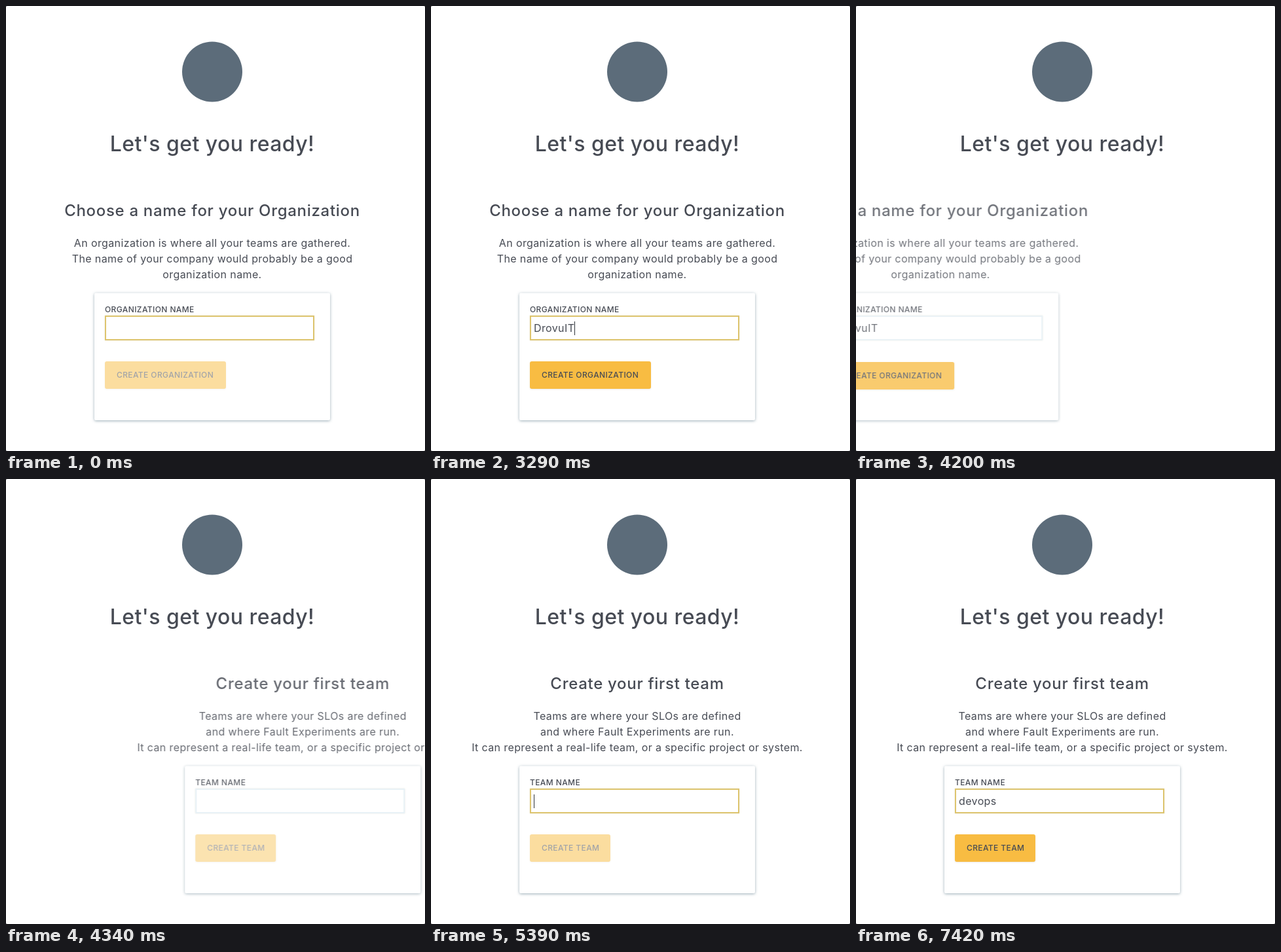
Animation of 640x680 px, one loop 7490 ms. Source, as an HTML page:

```html
<!DOCTYPE html>
<html lang="en">
<head>
<meta charset="utf-8">
<title>Onboarding</title>
<style>
  html, body { margin: 0; width: 100%; height: 100%; overflow: hidden; background: #858585; }
  svg { display: block; width: 640px; height: 680px; }
  text { font-family: Inter, "Open Sans", sans-serif; fill: #474b54; white-space: pre; }
  .title { font-size: 32px; font-weight: 500; letter-spacing: .014em; }
  .heading { font-size: 24px; font-weight: 500; letter-spacing: .029em; }
  .body { font-size: 16px; letter-spacing: .024em; }
  .small { font-size: 12px; font-weight: 500; letter-spacing: .033em; }
  .mid { text-anchor: middle; }
  .card { fill: #fff; filter: drop-shadow(0 1px 2px rgba(64, 98, 116, .52)); }
  .button { fill: #f8bc42; filter: drop-shadow(0 1px 1px rgba(90, 90, 90, .12)); }
  .box { fill: #fff; stroke-width: 2; filter: drop-shadow(0 0 1px rgba(190, 190, 160, .35)); }
</style>
</head>
<body>
<svg id="stage" viewBox="0 0 640 680"></svg>
<script>
const LOOP = 7490, STEP = 70, WIDTH = 640, CX = 315;
const stage = document.getElementById('stage');

function add(parent, tag, attrs, content) {
  const el = document.createElementNS('http://www.w3.org/2000/svg', tag);
  for (const key in attrs) el.setAttribute(key, attrs[key]);
  if (content) el.textContent = content;
  parent.appendChild(el);
  return el;
}

const rect = (parent, x, y, width, height, attrs) =>
  add(parent, 'rect', { x, y, width, height, ...attrs });
const label = (parent, x, y, cls, content) =>
  add(parent, 'text', { x, y, class: cls }, content);

const progress = (t, from, to) => Math.min(1, Math.max(0, (t - from) / (to - from)));
const within = (t, spans) => spans.some(([from, to]) => t >= from && t < to);

// Blend from the idle to the focused border colour
function borderColor(k) {
  const idle = [228, 239, 244], focus = [221, 196, 110];
  return `rgb(${idle.map((c, i) => Math.round(c + (focus[i] - c) * k))})`;
}

function makeForm(spec) {
  const root = add(stage, 'g', {});
  label(root, CX, 321, 'heading mid', spec.heading);
  spec.lines.forEach((line, i) => label(root, CX, 368 + i * 24, 'body mid', line));
  rect(root, 135, 438.5, 360, 194.5, { rx: 2, class: 'card' });
  label(root, 151, 468, 'small', spec.field);
  const box = rect(root, 152, 474, 318, 36, { class: 'box' });
  const value = label(root, 157, 498, 'body', '');
  const caret = rect(root, 157, 482, 1, 21, { fill: '#30343a' });
  const button = add(root, 'g', {});
  rect(button, 151, 543, spec.buttonWidth, 42, { rx: 3, class: 'button' });
  label(button, 169, 568, 'small', spec.action);

  return t => {
    const { shift, focus, enabled, pressed } = spec.pose(t);
    const visible = Math.abs(shift) < 1;
    root.setAttribute('display', visible ? 'inline' : 'none');
    if (!visible) return;
    root.setAttribute('transform', `translate(${shift * WIDTH} 0)`);
    root.setAttribute('opacity', 1 - .8 * Math.abs(shift));
    box.setAttribute('stroke', borderColor(focus));
    value.textContent = spec.text.slice(0, spec.keys.filter(k => t >= k).length);
    const end = value.textContent ? value.getComputedTextLength() : 0;
    caret.setAttribute('x', Math.round(157 + end));
    caret.setAttribute('opacity', within(t, spec.blink) ? 1 : 0);
    button.setAttribute('opacity', .5 + .5 * enabled);
    button.setAttribute('transform', `translate(0 ${pressed ? 1 : 0})`);
  };
}

rect(stage, 0, 0, WIDTH, 680, { rx: 2.5, fill: '#fff' });
add(stage, 'circle', { cx: CX, cy: 100.5, r: 46, fill: '#5c6c7a' });
label(stage, CX, 222, 'title mid', "Let's get you ready!");

const forms = [
  makeForm({
    heading: 'Choose a name for your Organization',
    lines: [
      'An organization is where all your teams are gathered.',
      'The name of your company would probably be a good',
      'organization name.'
    ],
    field: 'ORGANIZATION NAME',
    action: 'CREATE ORGANIZATION',
    buttonWidth: 185,
    text: 'DrovuIT',
    keys: [70, 420, 1050, 1190, 1260, 2030, 2240],
    blink: [[70, 910], [1050, 1330], [1820, 2730], [3220, 3710]],
    pose: t => ({
      shift: -Math.pow(progress(t, 4060, 4270), 3.05),
      focus: 1 - progress(t, 3640, 3780),
      enabled: progress(t, 0, 420),
      pressed: t >= 3710
    })
  }),
  makeForm({
    heading: 'Create your first team',
    lines: [
      'Teams are where your SLOs are defined',
      'and where Fault Experiments are run.',
      'It can represent a real-life team, or a specific project or system.'
    ],
    field: 'TEAM NAME',
    action: 'CREATE TEAM',
    buttonWidth: 123,
    text: 'devops',
    keys: [6160, 6300, 6440, 6580, 6650, 6720],
    blink: [[5110, 6020], [6160, 7210]],
    pose: t => ({
      shift: Math.pow(1 - progress(t, 4270, 4480), 3.78),
      focus: progress(t, 5040, 5390),
      enabled: progress(t, 6090, 6510),
      pressed: false
    })
  })
];

const start = performance.now();

function draw(now) {
  const time = Math.max(0, now - start) % LOOP;
  const t = Math.floor(time / STEP) * STEP;
  forms.forEach(update => update(t));
  requestAnimationFrame(draw);
}
draw(start);
</script>
</body>
</html>
```
